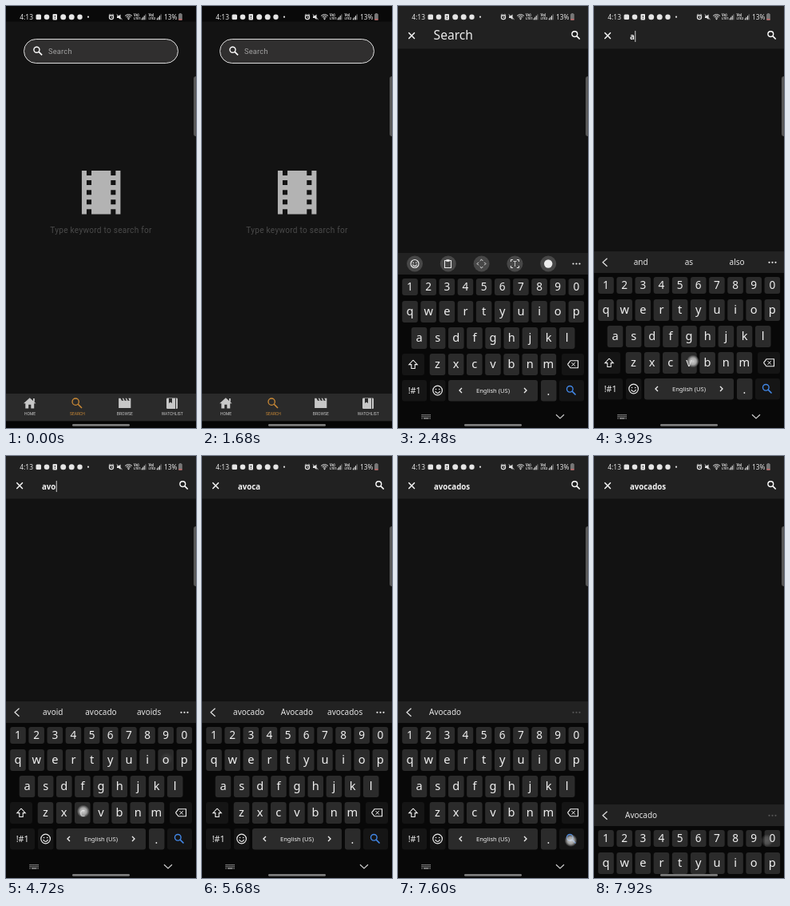
An HTML page with a canvas for the animation above (8 s loop, 238 px wide and 528 px high).

```html
<!DOCTYPE html>
<html lang="en">
<head>
<meta charset="utf-8">
<title>Film search</title>
<style>
html, body { margin: 0; width: 100%; height: 100%; overflow: hidden; background: #121212; }
canvas { display: block; width: 238px; height: 528px; }
</style>
</head>
<body>
<canvas id="stage" width="238" height="528"></canvas>
<script>
const c = document.getElementById('stage').getContext('2d');
const W = 238, H = 528, LOOP = 8000;
const UI = '"Noto Sans", sans-serif', APP = 'Roboto, sans-serif';
const WORD = 'avocados';
const TYPED = [3450, 4040, 4400, 4780, 5170, 6420, 6740, 7080];
const KB_TOP = 307, KB_H = H - KB_TOP, PITCH = 23.15;
const ROWS = [
  { keys: '1234567890', x: 15, y: 349.5, h: 21, size: 13.6 },
  { keys: 'qwertyuiop', x: 15, y: 380.5, h: 27, size: 14.6 },
  { keys: 'asdfghjkl', x: 26.5, y: 413.5, h: 27, size: 14.6 },
  { keys: 'zxcvbnm', x: 49.5, y: 446.5, h: 27, size: 14.6 }
];
const HINTS = [
  [], ['and', 'as', 'also'], ['available', 'average', 'avoid'],
  ['avoid', 'avocado', 'avoids'], ['avocado', 'Avocado', 'avocados']
];
const TAPS = [{ x: 126, y: 57, down: 1710, up: 1830 }];
TYPED.forEach((t, i) => {
  const p = keyPos(WORD[i]);
  TAPS.push({ x: p.x + (i === 1 ? 5 : 1), y: p.y - 2, down: t - 150, up: t });
});
TAPS.push({ x: 216.5, y: 481, down: 7540, up: 7680 });

const THEATERS = new Path2D('M18 3v2h-2V3H8v2H6V3H4v18h2v-2h2v2h8v-2h2v2h2V3h-2z' +
  'M8 17H6v-2h2v2zm0-4H6v-2h2v2zm0-4H6V7h2v2zm10 8h-2v-2h2v2zm0-4h-2v-2h2v2zm0-4h-2V7h2v2z');
const HOUSE = new Path2D('M10 20v-6h4v6h5v-8h3L12 3 2 12h3v8z');
const CLAPPER = new Path2D('M18 4l2 4h-3l-2-4h-2l2 4h-3l-2-4H8l2 4H7L5 4H2v16h20V4h-4z');

function keyPos(ch) {
  const r = ROWS.find(row => row.keys.includes(ch));
  return { x: r.x + r.keys.indexOf(ch) * PITCH, y: r.y };
}
const clamp = v => Math.min(1, Math.max(0, v));
const span = (t, a, b) => clamp((t - a) / (b - a));

function text(s, x, y, size, color, font = UI, align = 'left', weight = 400, gap = 0) {
  c.font = `${weight} ${size}px ${font}`;
  c.letterSpacing = gap + 'px';
  c.textAlign = align;
  c.fillStyle = color;
  c.fillText(s, x, y);
}
function rect(x, y, w, h, color) {
  c.fillStyle = color;
  c.fillRect(x, y, w, h);
}
function box(x, y, w, h, r, color) {
  c.beginPath();
  c.roundRect(x, y, w, h, r);
  c.fillStyle = color;
  c.fill();
}
function disc(x, y, r, color) {
  c.beginPath();
  c.arc(x, y, r, 0, 7);
  c.fillStyle = color;
  c.fill();
}
function ring(x, y, r, color, width = 1) {
  c.beginPath();
  c.arc(x, y, r, 0, 7);
  c.strokeStyle = color;
  c.lineWidth = width;
  c.stroke();
}
function line(pts, color, width = 1) {
  c.beginPath();
  for (let i = 0; i < pts.length; i += 2) c.lineTo(pts[i], pts[i + 1]);
  c.strokeStyle = color;
  c.lineWidth = width;
  c.stroke();
}
function icon(path, x, y, k, color) {
  c.save();
  c.translate(x, y);
  c.scale(k, k);
  c.fillStyle = color;
  c.fill(path, 'evenodd');
  c.restore();
}
function lens(x, y, k, color, width) {
  ring(x - 1.6 * k, y - 1.6 * k, 3.6 * k, color, width);
  line([x + 1.1 * k, y + 1.1 * k, x + 5.2 * k, y + 5.2 * k], color, width * 1.2);
}
function dots(x, y, color) {
  for (const d of [-4, 0, 4]) disc(x + d, y, 1.1, color);
}

function signal(x) {
  for (let i = 0; i < 4; i++) rect(x + i * 1.6, 15.5 - i * 1.7, 1.1, 1.8 + i * 1.7, i < 3 ? '#ddd' : '#777');
}
function statusBar() {
  const ink = '#e4e4e4';
  text('4:13', 17.3, 16.8, 8.4, ink);
  box(37.5, 10.5, 6.5, 6.5, 1.5, ink);
  disc(51, 13.7, 3.3, ink);
  box(58.5, 10, 5.5, 7.5, 1, ink);
  rect(60.8, 11.8, 1, 2.4, '#222');
  rect(60.8, 15, 1, 1, '#222');
  disc(71.7, 13.7, 3.5, ink);
  disc(82.2, 13.7, 3.5, ink);
  disc(92.5, 13.7, 3.2, ink);
  disc(103, 13.7, 1.1, ink);
  ring(132, 14, 2.6, ink, 1.2);
  line([132, 12.4, 132, 14.3, 133.4, 14.3], ink, 0.8);
  line([128.8, 11.6, 130.5, 10.2], ink);
  line([133.5, 10.2, 135.2, 11.6], ink);
  c.beginPath();
  c.moveTo(139, 12.5); c.lineTo(141, 12.5); c.lineTo(143.5, 10.4);
  c.lineTo(143.5, 17); c.lineTo(141, 15); c.lineTo(139, 15);
  c.fillStyle = ink;
  c.fill();
  line([138.7, 10.5, 145.5, 16.8], ink, 0.9);
  for (const r of [2.2, 4.2, 6.2]) {
    c.beginPath();
    c.arc(153.5, 16.8, r, -2.35, -0.8);
    c.strokeStyle = ink;
    c.lineWidth = 1;
    c.stroke();
  }
  disc(153.5, 16.3, 0.9, ink);
  [[160, 169.5], [178.5, 188.8]].forEach(([x, s], i) => {
    text('Vo)', x, 13, 4.3, ink, UI, 'left', 600);
    text('LTE' + (i + 1), x, 17.3, 3.8, ink, UI, 'left', 600);
    signal(s);
  });
  text('13%', 198, 16.8, 8.3, ink);
  box(216, 9.8, 4.8, 8, 1, '#777');
  rect(217.3, 9, 2.2, 1, '#777');
  rect(216.3, 16.3, 4.2, 1.2, '#d66');
}

function edgeHandle() {
  box(235, 88, 6, 75, 3, '#585858');
}

function home() {
  rect(0, 0, W, H, '#131313');
  rect(0, 0, W, 19.5, '#090909');
  box(22.5, 41.5, 193, 30, 15, '#302f2f');
  c.strokeStyle = '#dedede';
  c.lineWidth = 1;
  c.stroke();
  lens(40, 56.3, 0.98, '#fff', 1.4);
  text('Search', 53, 59.6, 9.3, '#a2a2a2', APP, 'left', 400, 0.2);
  icon(THEATERS, 82.8, 196.8, 3.03, '#b3b3b3');
  text('Type keyword to search for', 119, 283.8, 10.1, '#4a4a4a', APP, 'center', 400, 0.25);

  rect(0, 485, W, 34.5, '#2a2a2a');
  rect(0, 519.5, W, 9, '#060606');
  const grey = '#c8c8c8', amber = '#cb8a36';
  icon(HOUSE, 20.4, 487.8, 0.78, grey);
  rect(34, 491, 1.8, 4, grey);
  lens(89, 497, 1.15, amber, 1.3);
  icon(CLAPPER, 139.6, 487.7, 0.76, grey);
  box(201, 490.5, 14, 13.5, 1.2, grey);
  rect(212, 490.5, 0.9, 13.5, '#2a2a2a');
  c.beginPath();
  c.moveTo(204, 491); c.lineTo(208, 491); c.lineTo(208, 497);
  c.lineTo(206, 495.5); c.lineTo(204, 497);
  c.fillStyle = '#2a2a2a';
  c.fill();
  ['HOME', 'SEARCH', 'BROWSE', 'WATCHLIST'].forEach((s, i) =>
    text(s, 30 + i * 59.4, 511.8, 5, i === 1 ? amber : grey, APP, 'center'));
}

function searchPage(t, count) {
  rect(0, 0, W, H, '#121212');
  rect(0, 0, W, 53.5, '#212121');
  line([13.3, 33.3, 20.9, 40.9], '#fff', 1.4);
  line([20.9, 33.3, 13.3, 40.9], '#fff', 1.4);
  lens(222.8, 36.6, 0.94, '#fff', 1.4);
  if (!count) {
    text('Search', 44.6, 42.4, 15.6, '#ececec');
    return;
  }
  const s = WORD.slice(0, count);
  text(s, 45, 42, 9.7, '#f6f6f6', UI, 'left', 600);
  const idle = t - TYPED[count - 1];
  if (idle % 960 < 500 && t < 7600) rect(45.4 + c.measureText(s).width, 31, 1, 14, '#ccc');
}

function toolIcons(y) {
  const ink = '#ececec';
  for (let i = 0; i < 5; i++) disc(21 + i * 41.8, y, 10, '#474747');
  face(21, y, 5, ink);
  c.strokeStyle = ink;
  c.lineWidth = 1;
  c.strokeRect(58.5, y - 4, 8, 9);
  rect(60.5, y - 5.3, 4, 2.6, ink);
  for (let i = 0; i < 4; i++) {
    c.save();
    c.translate(104.5, y);
    c.rotate(i * Math.PI / 2);
    line([-1.8, -3.6, 0, -5.4, 1.8, -3.6], ink);
    c.restore();
  }
  text('T', 146.4, y + 3.1, 8, ink, UI, 'center');
  for (const sx of [-1, 1]) for (const sy of [-1, 1])
    line([146.4 + sx * 5, y + sy * 2.5, 146.4 + sx * 5, y + sy * 5, 146.4 + sx * 2.5, y + sy * 5], ink);
  disc(188.2, y, 5.2, ink);
  dots(223.5, y, ink);
}
function face(x, y, r, ink) {
  ring(x, y, r, ink, 1.2);
  disc(x - r * 0.36, y - r * 0.25, 0.8, ink);
  disc(x + r * 0.36, y - r * 0.25, 0.8, ink);
  c.beginPath();
  c.arc(x, y + 0.4, r * 0.5, 0.2, 2.94);
  c.stroke();
}
function suggestions(count) {
  const y = 320.8, ink = '#e6e6e6';
  line([16.5, y - 5, 11, y, 16.5, y + 5], ink, 1.2);
  if (count === WORD.length) {
    text('Avocado', 39, y + 3.5, 10, ink);
    dots(223.5, y, '#555');
    return;
  }
  HINTS[Math.min(count, 4)].forEach((s, i) => text(s, 58.7 + i * 60.2, y + 3.5, 10, ink, UI, 'center'));
  dots(223.5, y, ink);
}

function keyboard(drop, count) {
  if (drop >= KB_H) return;
  const ink = '#f0f0f0', key = '#2b2b2b', dark = '#151515';
  c.save();
  c.translate(0, drop);
  rect(0, KB_TOP, W, KB_H, '#080808');
  rect(0, KB_TOP, W, 27, '#222');
  if (count) suggestions(count); else toolIcons(320.5);
  for (const r of ROWS) {
    [...r.keys].forEach((ch, i) => {
      const x = r.x + i * PITCH;
      box(x - 9.8, r.y - r.h / 2, 19.6, r.h, 3, key);
      text(ch, x, r.y + 4.7, r.size, ink, UI, 'center');
    });
  }
  box(5, 433, 28, 27, 3, dark);
  box(205, 433, 28, 27, 3, dark);
  line([19, 441, 13.8, 446.6, 16.8, 446.6, 16.8, 451.5, 21.2, 451.5, 21.2, 446.6, 24.2, 446.6, 19, 441], ink, 1.1);
  line([212.5, 446.3, 216, 441.8, 225.5, 441.8, 225.5, 450.8, 216, 450.8, 212.5, 446.3], ink, 1.1);
  line([217.5, 444.2, 221.8, 448.5], ink);
  line([221.8, 444.2, 217.5, 448.5], ink);

  box(5, 466, 31, 26.5, 3, dark);
  box(40, 466, 19.5, 26.5, 3, dark);
  box(63, 466, 112, 26.5, 3, key);
  box(179, 466, 19.5, 26.5, 3, key);
  box(202, 466, 31, 26.5, 3, dark);
  text('!#1', 20.7, 483, 10.8, ink, UI, 'center');
  face(49.6, 479, 5.8, ink);
  line([80, 476, 77, 479, 80, 482], ink, 1.3);
  line([158, 476, 161, 479, 158, 482], ink, 1.3);
  text('English (US)', 119, 481.8, 7.6, ink, UI, 'center');
  text('.', 188.5, 485, 14, ink, UI, 'center');
  lens(217, 479, 1.06, '#4287e6', 1.4);
  c.restore();

  c.globalAlpha = clamp(1 - drop / 50);
  for (let j = 0; j < 3; j++)
    for (let i = 0; i < 6; i++)
      if (j < 2 || i % 5 === 0) rect(29.5 + i * 2, 511 + j * 2.2, 1.2, 1.2, '#bbb');
  rect(32, 515.4, 6.5, 1.2, '#bbb');
  line([198, 511.3, 203, 516, 208, 511.3], '#d0d0d0', 1.2);
  c.globalAlpha = 1;
}

function touches(t) {
  for (const p of TAPS) {
    const a = t < p.up ? span(t, p.down, p.down + 25) : 0.9 * (1 - span(t, p.up, p.up + 360));
    if (t < p.down || a <= 0) continue;
    const g = c.createRadialGradient(p.x, p.y, 0, p.x, p.y, 8);
    g.addColorStop(0, 'rgba(235,235,235,.85)');
    g.addColorStop(0.55, 'rgba(205,205,205,.75)');
    g.addColorStop(0.8, 'rgba(150,150,150,.5)');
    g.addColorStop(1, 'rgba(120,120,120,0)');
    c.globalAlpha = a;
    disc(p.x, p.y, 8, g);
    c.globalAlpha = 1;
  }
}

// Distance the keyboard sits below its resting place, in whole pixels.
function keyboardDrop(t) {
  if (t < 4000) return Math.round(KB_H * Math.pow(1 - span(t, 2220, 2555), 3));
  const p = span(t, 7740, 8065);
  return Math.round(KB_H * p * p * (3 - 2 * p));
}

function draw(t) {
  const count = TYPED.filter(k => t >= k).length;
  const fade = span(t, 1860, 2140);
  if (fade < 1) home();
  if (fade > 0) {
    c.globalAlpha = fade;
    searchPage(t, count);
    c.globalAlpha = 1;
  }
  keyboard(keyboardDrop(t), count);
  statusBar();
  edgeHandle();
  box(83, 523, 72, 2.8, 1.4, '#7c7c7c');
  touches(t);
}

const start = performance.now();
function tick() {
  draw((performance.now() - start) % LOOP);
  requestAnimationFrame(tick);
}
tick();
</script>
</body>
</html>
```
